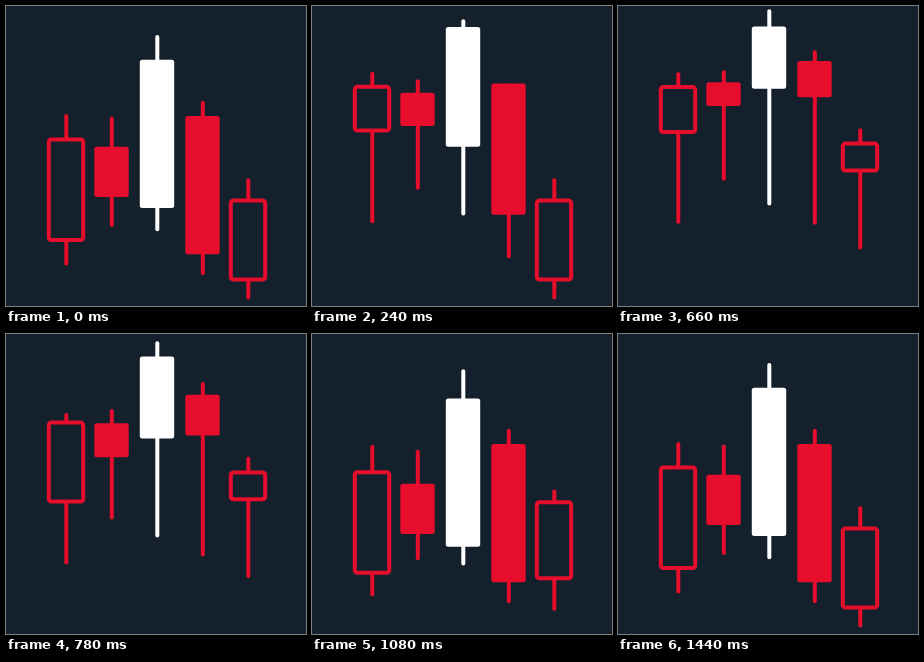
An HTML page with a canvas for the animation above (1830 ms loop, 300 by 300 pixels).

```html
<!DOCTYPE html>
<html lang="en">
<head>
<meta charset="utf-8">
<title>Candlestick wave</title>
<style>
html, body { margin: 0; width: 100%; height: 100%; overflow: hidden; background: #14202b; }
canvas { display: block; width: 100vw; height: 100vh; }
</style>
</head>
<body>
<canvas id="stage" width="300" height="300"></canvas>
<script>
const ctx = document.getElementById('stage').getContext('2d');
const BG = '#14202b', RED = '#e60d2d', WHITE = '#ffffff';
const LOOP = 1830, TICK = 30, STAGGER = 60, KEY = 60;
const HALF = 17.2, LINE = 4;

// Shared curves, one value every KEY ms.
const LIFT = [0, .34, .61, .745, .845, .945, .98, 1, 1, .99, .925, .835, .71, .58, .335, 0];
const SHRINK = [0, .07, .33, .61, .79, .94, .99, 1, 1, 1, .955, .77, .58, .3, .055, 0];
const REBOUND = [...Array(16).fill(0), 6.3, 5.3, 2.8, .9, 0];

// wick: [top, bottom], body: [top, bottom]; rise, climb and squash are in pixels.
const candles = [
  { x: 60,    color: RED,   hollow: true, wick: [108, 259.5],   body: [131.5, 236],   rise: 50, climb: 96,  squash: 72 },
  { x: 105.5, color: RED,   wick: [110.5, 221],                 body: [140.7, 191],   rise: 50, climb: 84,  squash: 28 },
  { x: 151,   color: WHITE, wick: [29, 225.3],                  body: [53.7, 202],    rise: 26, climb: 77,  squash: 86 },
  { x: 196.5, color: RED,   wick: [94.7, 269.3],                body: [110, 248.3],   rise: 50.5, climb: 106, squash: 102 },
  { x: 242,   color: RED,   hollow: true, wick: [172.3, 293.6], body: [192.6, 275.5], rise: 50, climb: 83,  squash: 52 }
];

// Catmull-Rom interpolation through evenly spaced values.
function sample(values, time) {
  const pos = time / KEY, i = Math.floor(pos), u = pos - i;
  const at = n => n < 0 ? -values[1] : values[n] ?? 0;
  const [a, b, c, d] = [at(i - 1), at(i), at(i + 1), at(i + 2)];
  return b + u / 2 * (c - a + u * (2 * a - 5 * b + 4 * c - d + u * (3 * (b - c) + d - a)));
}

function drawCandle(candle, time) {
  const { x, color, hollow, wick, body, rise, climb, squash } = candle;
  const lift = sample(LIFT, time), rebound = sample(REBOUND, time);
  const wickShift = rebound - rise * lift;
  const middle = (body[0] + body[1]) / 2 + 1.7 * rebound - climb * lift;
  const height = body[1] - body[0] - squash * sample(SHRINK, time);

  ctx.strokeStyle = color;
  ctx.lineWidth = LINE;
  ctx.lineCap = 'round';
  ctx.beginPath();
  ctx.moveTo(x + .3, wick[0] + LINE / 2 + wickShift);
  ctx.lineTo(x + .3, wick[1] - LINE / 2 + wickShift);
  ctx.stroke();

  const inset = hollow ? LINE / 2 : 0;
  ctx.fillStyle = hollow ? BG : color;
  ctx.beginPath();
  ctx.roundRect(x - HALF, middle - height / 2 + inset, HALF * 2, height - inset * 2, 2.5);
  ctx.fill();
  if (hollow) ctx.stroke();
}

function render(now) {
  const time = Math.floor(now % LOOP / TICK) * TICK;
  ctx.fillStyle = BG;
  ctx.fillRect(0, 0, 300, 300);
  candles.forEach((candle, i) => drawCandle(candle, Math.max(0, time - i * STAGGER)));
}

let start;
function frame(now) {
  start ??= now;
  render(now - start);
  requestAnimationFrame(frame);
}
render(0);
requestAnimationFrame(frame);
</script>
</body>
</html>
```
